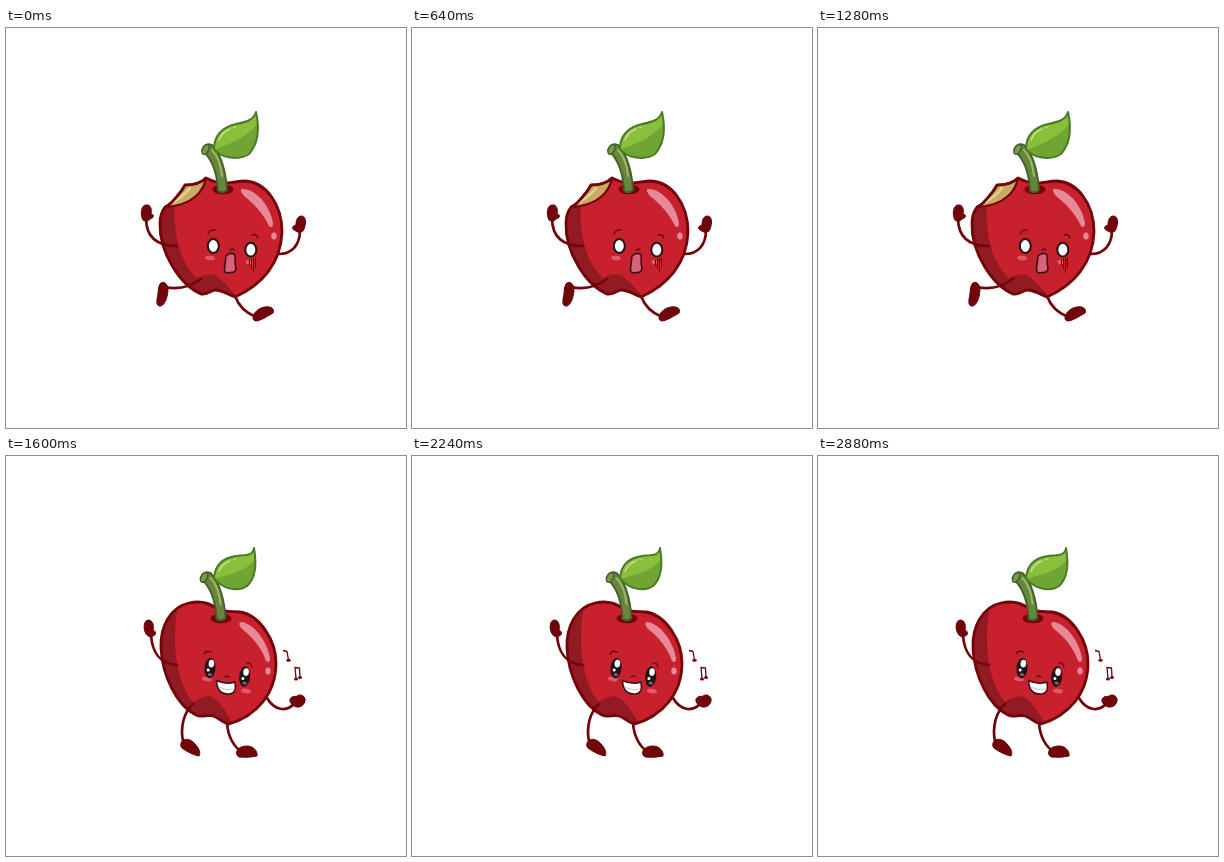
Recreate the animation shown at these times as an HTML page without scripts. Size 400 px wide and 400 px high, loop 3.12 s.

```html
<!DOCTYPE html>
<html lang="en">
<head>
<meta charset="utf-8">
<title>Cherry moods</title>
<style>
html, body { margin: 0; width: 100%; height: 100%; overflow: hidden; background: #fff; }
svg { display: block; width: 100%; height: 100%; }
.pose { animation: 3120ms step-end infinite; }
.scared { animation-name: scared; }
.happy { animation-name: happy; }
/* poses swap every 320 ms; the last one is held for 240 ms */
@keyframes scared {
  0%, 20.5128%, 41.0256%, 61.5385%, 82.0513% { visibility: visible; }
  10.2564%, 30.7692%, 51.2821%, 71.7949%, 92.3077%, 100% { visibility: hidden; }
}
@keyframes happy {
  0%, 20.5128%, 41.0256%, 61.5385%, 82.0513% { visibility: hidden; }
  10.2564%, 30.7692%, 51.2821%, 71.7949%, 92.3077%, 100% { visibility: visible; }
}
.skin { fill: #c8202d; }
.shade { fill: #911a23; }
.rim { fill: none; stroke: #720509; stroke-width: 2.8; stroke-linejoin: round; }
.limb { fill: none; stroke: #720509; stroke-width: 2.7; stroke-linecap: round; }
.tip { fill: #720509; stroke: #5c0407; stroke-width: 1; }
.pit { fill: #720509; }
.shine { fill: #e58a96; }
.blush { fill: #e2586c; }
.ink { fill: none; stroke: #2a1216; stroke-width: 1; stroke-linecap: round; }
.brow { fill: none; stroke: #650a10; stroke-width: 1.4; stroke-linecap: round; }
.mouth { stroke: #3a1018; stroke-width: 1.6; stroke-linejoin: round; }
.leaf { fill: #8abf3c; }
.leaf-low { fill: #70a433; }
.leaf-rim { fill: none; stroke: #4a7a24; stroke-width: 2; stroke-linejoin: round; }
.glint { fill: none; stroke: #c3df8e; stroke-width: 1.6; stroke-linecap: round; }
.note { fill: none; stroke: #720509; stroke-width: 1.3; stroke-linejoin: round; }
</style>
</head>
<body>
<svg viewBox="0 0 400 400">
  <defs>
    <path id="bodyA" d="M200 150C206 153 211 155 218 155C225 155 231 153 239 153C259 154 276 175 276 204C275 235 256 257 229 269C222 267 217 262 209 262C204 263 201 267 195 266C174 257 153 224 154 195C154 188 156 183 159 179C164 177 169 171 172 167C175 164 177 160 179 157C188 157 195 155 200 150Z"/>
    <path id="bodyB" d="M210 152C202 146 192 145 183 147C164 151 154 171 155 192C156 219 171 250 190 259C196 262 201 258 207 260C213 262 217 267 223 268C250 260 270 238 270 207C270 185 254 159 234 156C226 155 219 157 210 152Z"/>
    <path id="leafA" d="M250 84C254 102 252 116 243 126C233 133 214 130 208 121C208 108 216 99 230 96C240 94 248 92 250 84Z"/>
    <path id="leafB" d="M248 92C251 109 250 122 241 130C231 137 215 132 208 122C209 109 216 102 230 100C239 99 247 100 248 92Z"/>
    <clipPath id="clipA"><use href="#bodyA"/></clipPath>
    <clipPath id="clipB"><use href="#bodyB"/></clipPath>
    <g id="stem">
      <path d="M195 122C203 129 210 140 211 163Q216 166 220 162C219 144 214 126 205 117Q198 114 195 122Z" fill="#66873a" stroke="#40602a" stroke-width="1.800" stroke-linejoin="round"/>
      <path d="M205 122C211 128 214 138 215 148" fill="none" stroke="#a0b56c" stroke-width="2" stroke-linecap="round"/>
      <ellipse cx="198.500" cy="121.500" rx="3" ry="5.200" transform="rotate(28 198.500 121.500)" fill="#7c9a48" stroke="#40602a" stroke-width="1.500"/>
    </g>
    <g id="eye">
      <ellipse rx="5.500" ry="10.300" fill="#211316"/>
      <ellipse cx="1" cy="-4.500" rx="2.800" ry="3.800" fill="#fff"/>
      <circle cx="-1.600" cy="2.200" r="1.500" fill="#fff"/>
      <ellipse cx=".6" cy="6.600" rx="2.200" ry="1.500" fill="#76636a"/>
    </g>
  </defs>

  <g class="pose scared">
    <path class="limb" d="M273 226C286 226 294 217 294 202M229 268C233 279 240 285 250 289"/>
    <path class="tip" d="M137 192C134 187 135 177 140 177C145 176 146 182 145 186C149 187 148 190 144 191Q141 195 137 192Z"/>
    <path class="tip" d="M297 203C300 198 301 189 296 188C291 188 290 193 290 197C285 198 286 202 290 203Q293 206 297 203Z"/>
    <path class="tip" d="M247 291C247 285 252 280 259 279C265 278 269 281 267 285C262 288 254 293 250 293Q248 293 247 291Z"/>
    <use href="#bodyA" class="skin"/>
    <g clip-path="url(#clipA)">
      <path class="shade" d="M150 170L169 178C167 205 174 235 191 250C198 247 203 245 209 247C216 252 223 259 230 268L225 274H150Z"/>
    </g>
    <path d="M159 179C164 177 169 171 172 167Q177 162 179 157C188 157 195 155 200 150Q198 161 190 168Q179 178 159 179Z" fill="#c9ac62" stroke="#720509" stroke-width="2.200" stroke-linejoin="round"/>
    <path d="M168 174Q179 167 184 160" fill="none" stroke="#e3d296" stroke-width="2.200" stroke-linecap="round"/>
    <use href="#bodyA" class="rim"/>
    <path class="limb" d="M171 218C150 218 140 208 140 190M195 251C184 259 172 262 159 259"/>
    <path class="tip" d="M154 256C157 252 162 256 162 261C162 266 160 276 155 278C149 279 151 271 152 266Q152 259 154 256Z"/>
    <path class="shine" d="M236 161C248 160 264 176 267 195Q267 201 263 198C257 185 248 176 238 168Q233 162 236 161Z"/>
    <ellipse class="shine" cx="268" cy="208" rx="2.700" ry="3.500"/>
    <ellipse class="pit" cx="217" cy="161.500" rx="10.500" ry="4.800"/>
    <use href="#stem" x="1"/>
    <use href="#leafA" class="leaf"/>
    <path class="leaf-low" d="M208 122C220 117 240 111 251 96C254 117 243 129 229 130Q214 129 208 122Z"/>
    <path class="glint" d="M213 112Q216 104 224 101M228 99.500H229"/>
    <use href="#leafA" class="leaf-rim"/>
    <ellipse class="blush" cx="204" cy="230" rx="5" ry="2.200" transform="rotate(6 204 230)"/>
    <ellipse class="blush" cx="243" cy="234" rx="3.500" ry="2.200"/>
    <g fill="#fff" stroke="#211316" stroke-width="2">
      <ellipse cx="207.300" cy="218" rx="5.500" ry="6.900"/>
      <ellipse cx="244.800" cy="221.700" rx="5.500" ry="6.900"/>
    </g>
    <path class="brow" d="M202 206Q204 201 209 202M246 207Q250 205 252 210M224 222Q226 220 228 222"/>
    <path class="ink" d="M243.500 232V237M245.500 231V240M247.500 231V243M249.500 230V239"/>
    <path class="mouth" d="M220 228Q224 224 228 226Q230 228 229 234L230 241Q229 245 224 244.500Q218 246 218.500 241Z" fill="#d8617b"/>
  </g>

  <g class="pose happy">
    <path class="limb" d="M261 242C268 254 280 257 289 247M221 267C222 281 228 291 237 297"/>
    <path class="tip" d="M141 179C137 175 137 165 142 164C147 164 148 170 147 174C151 176 150 179 147 180Q143 182 141 179Z"/>
    <path class="tip" d="M284 243C287 239 290 241 291 240C295 237 300 241 299 245C298 251 290 253 287 249Q283 247 284 243Z"/>
    <path class="tip" d="M231 299C229 294 234 290 241 290C247 290 252 295 251 300Q243 302 233 301Z"/>
    <use href="#bodyB" class="skin"/>
    <g clip-path="url(#clipB)">
      <path class="shade" d="M150 145L172 150C166 180 168 223 187 246C194 242 200 239 206 241C213 245 220 255 227 268L223 274H150Z"/>
    </g>
    <use href="#bodyB" class="rim"/>
    <path class="limb" d="M171 209C154 208 146 196 145 179M187 248C178 256 174 271 177 285"/>
    <path class="tip" d="M175 287C178 281 185 283 189 288C193 292 195 297 193 300C187 299 180 295 176 292Q174 290 175 287Z"/>
    <path class="shine" d="M235 166C247 167 261 184 264 202Q264 208 260 205C256 193 247 181 236 173Q231 167 235 166Z"/>
    <ellipse class="shine" cx="262" cy="215" rx="2.700" ry="3.500"/>
    <ellipse class="pit" cx="215" cy="162.500" rx="10.500" ry="4.800"/>
    <use href="#stem" x="-.5"/>
    <use href="#leafB" class="leaf"/>
    <path class="leaf-low" d="M208 123C221 119 239 116 249 104C251 123 241 133 228 134Q214 131 208 123Z"/>
    <path class="glint" d="M213 115Q216 108 224 105M228 103.500H229"/>
    <use href="#leafB" class="leaf-rim"/>
    <ellipse class="blush" cx="201" cy="223" rx="5" ry="2.300" transform="rotate(8 201 223)"/>
    <ellipse class="blush" cx="240" cy="235" rx="5" ry="2.300" transform="rotate(8 240 235)"/>
    <use href="#eye" transform="translate(204 212) rotate(5)"/>
    <use href="#eye" transform="translate(238.700 220.500) rotate(5)"/>
    <path class="brow" d="M198 198Q200 194 205 196M241 207Q245 206 246 211M219 221Q221 219 223 221"/>
    <path class="mouth" d="M210.500 224.500Q220 229 229 226Q231 237 224 238Q211 239 210.500 224.500Z" fill="#fff"/>
    <path d="M212 231Q220 235 229 233" fill="none" stroke="#b9a5a9" stroke-width=".7"/>
    <path class="note" d="M277 194.500L281 195.500L282.500 204M290 222L289 211.500L293.500 212L294 221"/>
    <g fill="#720509">
      <ellipse cx="282.500" cy="204.300" rx="2.200" ry="1.500"/>
      <ellipse cx="290" cy="223" rx="2" ry="1.500"/>
      <ellipse cx="294" cy="221.500" rx="2" ry="1.500"/>
    </g>
  </g>
</svg>
</body>
</html>
```
